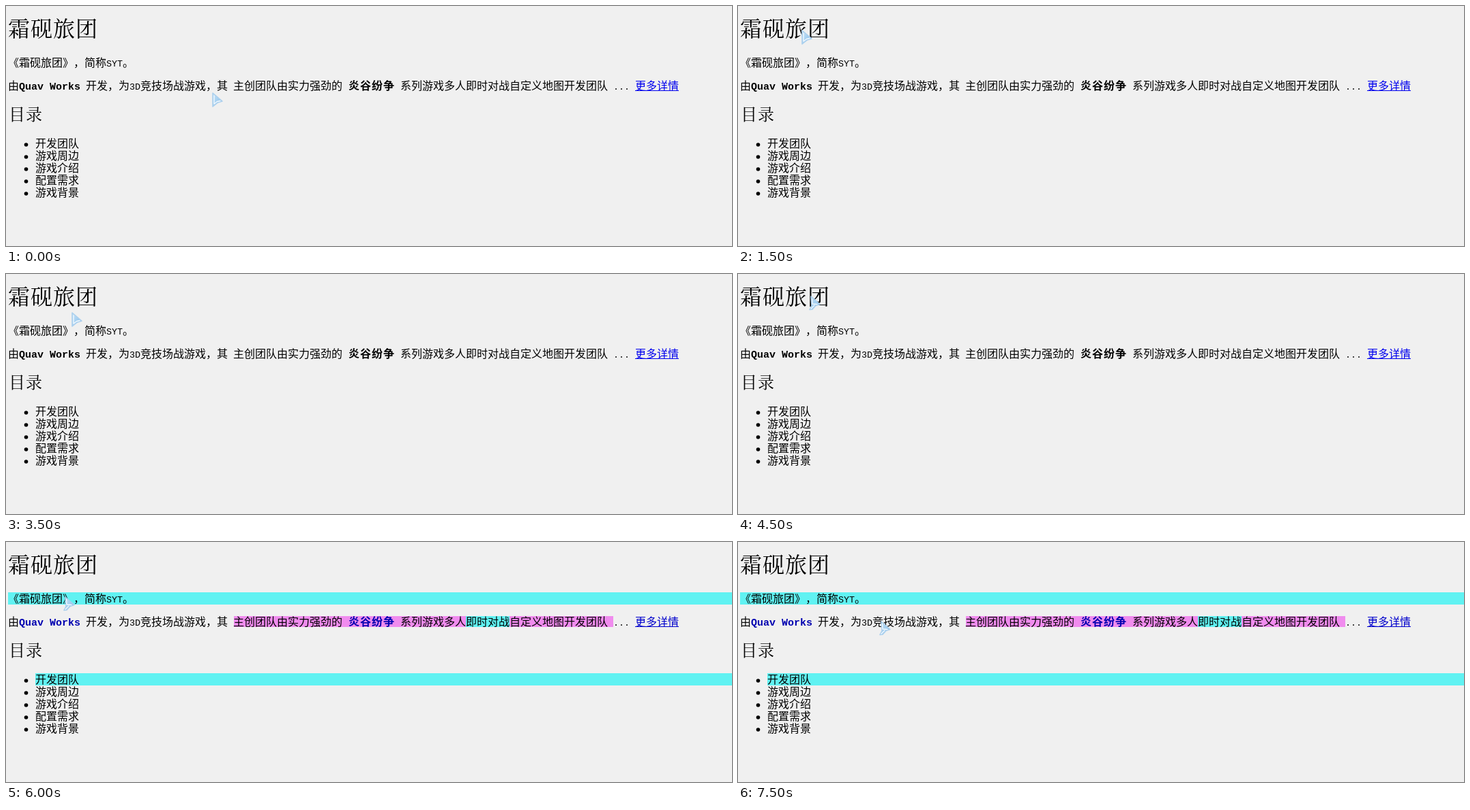
Animation of 1064x353 px, one loop 8 s. Source, as an HTML page:

```html
<!DOCTYPE html>
<html lang="zh-CN">
<head>
<meta charset="utf-8">
<style>
html, body { margin: 0; width: 100%; height: 100%; overflow: hidden; background: #f0f0f0; }
svg { display: block; width: 1064px; height: 353px; }
text {
  font: 16px "Noto Sans CJK SC", "Noto Sans CJK", sans-serif;
  font-weight: 300; font-kerning: none; text-spacing-trim: space-all; white-space: pre;
}
.latin { font: 13.333px "Liberation Mono", monospace; }
.bold { font-weight: 700; letter-spacing: 1px; }
.bold.latin { font-size: 15px; letter-spacing: 0; }
.title { font-family: "Noto Serif CJK SC", "Noto Sans CJK SC", serif; font-weight: 500; letter-spacing: 1px; }
.link { fill: #00e; }
.marked .bold { fill: #0000b0; }
.marked .link { fill: #0000cc; }
#marks { visibility: hidden; }
.marked #marks { visibility: visible; }
</style>
</head>
<body>
<svg id="stage" viewBox="0 0 1064 353">
  <defs>
    <linearGradient id="ice" x2="1" y2="1">
      <stop stop-color="#c9e4f7"/><stop offset="1" stop-color="#82bbe9"/>
    </linearGradient>
  </defs>
  <g id="marks" fill="#60f2f2">
    <rect x="3" y="74" width="1061" height="18"/>
    <rect x="43" y="193" width="1021" height="18"/>
    <rect x="334" y="109" width="556" height="16" fill="#f08cee"/>
    <rect x="674" y="109" width="64" height="16"/>
  </g>
  <g id="copy"></g>
  <g id="cursor" stroke-linejoin="round" stroke-linecap="round">
    <path id="body" fill="url(#ice)" stroke="#acd0ed" stroke-width="1.6"/>
    <path id="shine" fill="none" stroke="#f4faff" stroke-width="1.3"/>
  </g>
</svg>
<script>
const $ = id => document.getElementById(id);
const NS = "http://www.w3.org/2000/svg";

function add(tag, attrs, text = "") {
  const el = document.createElementNS(NS, tag);
  for (const key in attrs) el.setAttribute(key, attrs[key]);
  el.textContent = text;
  $("copy").append(el);
}
const write = (text, x, y, cls = "", style = "") => add("text", { x, y, class: cls, style }, text);

write("霜砚旅团", 3, 45, "title", "font-size:32px");
write("《霜砚旅团》,简称".replace(",", "\uff0c"), 3, 89);
write("SYT", 147, 89, "latin");
write("。", 171, 89);

const line = 123;
write("由", 3, line);
write("Quav Works", 19, line, "bold latin");
write("开发\uff0c为", 117, line);
write("3D", 181, line, "latin");
write("竞技场战游戏\uff0c其", 197, line);
write("主创团队由实力强劲的", 333, line);
write("炎谷纷争", 502, line, "bold");
write("系列游戏多人即时对战自定义地图开发团队", 578, line);
write("...", 890, line, "latin");
write("更多详情", 922, line, "link");
add("rect", { x: 922, y: 124, width: 64, height: 1, class: "link" });

write("目录", 4, 168, "title", "font-size:24px");
["开发团队", "游戏周边", "游戏介绍", "配置需求", "游戏背景"].forEach((item, i) => {
  add("circle", { cx: 29.5, cy: 204 + i * 18, r: 2.8 });
  write(item, 43, 208 + i * 18);
});

// Pointer position for each half second
const STEP = 500;
const stops = [
  [301, 127], [238, 73], [102, 44], [92, 35], [59, 233], [618, 193], [482, 128], [95, 56],
  [104, 32], [104, 32], [50, 34], [79, 80], [84, 80], [255, 104], [221, 120], [207, 116]
];
const arrow = { body: "M2 1L16 13L9.5 15L2 21Z", shine: "M4 5V17L8.5 13.5L13 12.5" };
const tailed = { body: "M3 1L16 12.5L10 14.5L5 20L1 20.5L4 15Z", shine: "M4.5 4.5L5 12L12 12.5M8 14L3 19" };

function draw() {
  const i = Math.floor(performance.now() % (stops.length * STEP) / STEP);
  const shape = i < 8 ? arrow : tailed;
  $("cursor").setAttribute("transform", `translate(${stops[i]})`);
  for (const part in shape) $(part).setAttribute("d", shape[part]);
  $("stage").classList.toggle("marked", i >= 12);
  requestAnimationFrame(draw);
}
draw();
</script>
</body>
</html>
```
